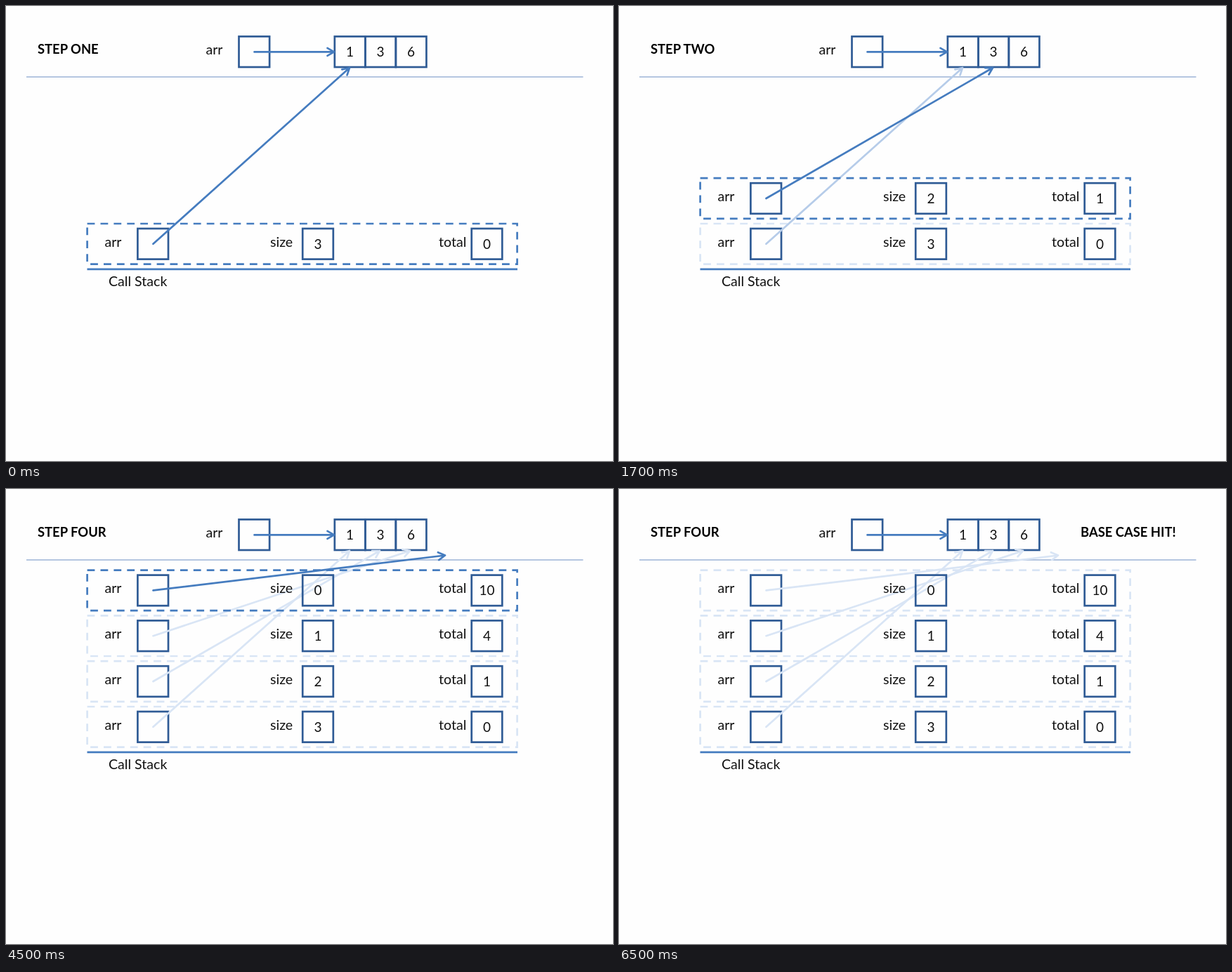
An HTML page that plays this animation: 864x648 px, repeating every 8 s.

```html
<!DOCTYPE html>
<html lang="en">
<head>
<meta charset="utf-8">
<title>Recursive array sum</title>
<style>
  html, body { margin: 0; width: 100%; height: 100%; overflow: hidden; background: #fefefe; }
  svg { display: block; width: 864px; height: 648px; }
  text { font: 19.6px Lato, "Open Sans", sans-serif; fill: #111; }
  .head { font-size: 18.4px; font-weight: 700; fill: #000; }
  .num { font-size: 19px; text-anchor: middle; }
  path, rect { fill: none; stroke-width: 2.7; }
  .box { stroke: #2f5b95; }
  .frame { stroke-dasharray: 10.8 8.1; }
  .arrow { stroke-linecap: round; stroke-linejoin: round; }
</style>
</head>
<body>
<svg id="stage" viewBox="0 0 864 648"></svg>
<script>
const BLUE = '#457cbf', SOFT = '#b6cce9', PALE = '#d9e5f5';
const LOOP = 8000, PITCH = 64.8;
const STEPS = [
  { at: 0, title: 'STEP ONE', rows: 1, active: 0 },
  { at: 500, title: 'STEP TWO', rows: 2, active: 1 },
  { at: 2500, title: 'STEP THREE', rows: 3, active: 2 },
  { at: 4500, title: 'STEP FOUR', rows: 4, active: 3 },
  { at: 6500, title: 'STEP FOUR', rows: 4, active: -1, note: 'BASE CASE HIT!' }
];
const TOTALS = [0, 1, 4, 10];
const TIPS = [[489, 88], [532, 88], [575, 88], [625, 94.5]];
const stage = document.getElementById('stage');

function add(parent, tag, attrs, text) {
  const el = document.createElementNS('http://www.w3.org/2000/svg', tag);
  for (const key in attrs) el.setAttribute(key, attrs[key]);
  if (text !== undefined) el.textContent = text;
  return parent.appendChild(el);
}

const label = (parent, x, y, text, cls = '') =>
  add(parent, 'text', { x, y, class: cls }, text);

// A square cell around its centre, with an optional number.
function cell(parent, x, y, value) {
  add(parent, 'rect', { x: x - 21.8, y: y - 21.8, width: 43.6, height: 43.6, class: 'box' });
  if (value !== undefined) label(parent, x, y + 7, value, 'num');
}

function arrow(parent, x1, y1, x2, y2) {
  const dir = Math.atan2(y2 - y1, x2 - x1);
  const wing = side => {
    const a = dir + side * 0.52;
    return `${x2 - 11 * Math.cos(a)} ${y2 - 11 * Math.sin(a)}`;
  };
  return add(parent, 'path', {
    d: `M${x1} ${y1}L${x2} ${y2}M${wing(1)}L${x2} ${y2}L${wing(-1)}`,
    class: 'arrow', stroke: BLUE
  });
}

function makeRow(i) {
  const g = add(stage, 'g', {});
  const y = 338.8 - i * PITCH;
  const frame = add(g, 'rect', { x: 115.6, y: y - 28.8, width: 612, height: 57.6, class: 'frame' });
  label(g, 140.5, y + 3.8, 'arr');
  cell(g, 209.2, y);
  label(g, 376, y + 3.8, 'size');
  cell(g, 444, y, 3 - i);
  label(g, 616, y + 3.8, 'total');
  cell(g, 684.5, y, TOTALS[i]);
  return { g, frame, pointer: arrow(g, 209.5, y, ...TIPS[i]) };
}

add(stage, 'path', { d: 'M29 101H821.5', style: 'stroke-width:1.1', stroke: '#6f8fc4' });
const title = label(stage, 45, 67.6, '', 'head');
const note = label(stage, 657, 67.6, '', 'head');
label(stage, 284.5, 68.8, 'arr');
cell(stage, 353.3, 65.2);
[1, 3, 6].forEach((n, i) => cell(stage, 489.6 + i * 43.5, 65.2, n));
arrow(stage, 353.5, 65.4, 467, 65.4);
add(stage, 'path', { d: 'M115.5 374.8H728', stroke: BLUE });
label(stage, 146, 399, 'Call Stack');
const rows = TOTALS.map((_, i) => makeRow(i));

let shown;
function show(step) {
  if (step === shown) return;
  shown = step;
  title.textContent = step.title;
  note.textContent = step.note || '';
  rows.forEach(({ g, frame, pointer }, i) => {
    const on = i === step.active;
    g.setAttribute('visibility', i < step.rows ? 'visible' : 'hidden');
    frame.setAttribute('stroke', on ? BLUE : PALE);
    pointer.setAttribute('stroke', on ? BLUE : step.rows === 2 ? SOFT : PALE);
  });
}

const start = performance.now();
function tick() {
  const t = (performance.now() - start) % LOOP;
  show(STEPS.filter(s => s.at <= t).pop());
  requestAnimationFrame(tick);
}
tick();
</script>
</body>
</html>
```
